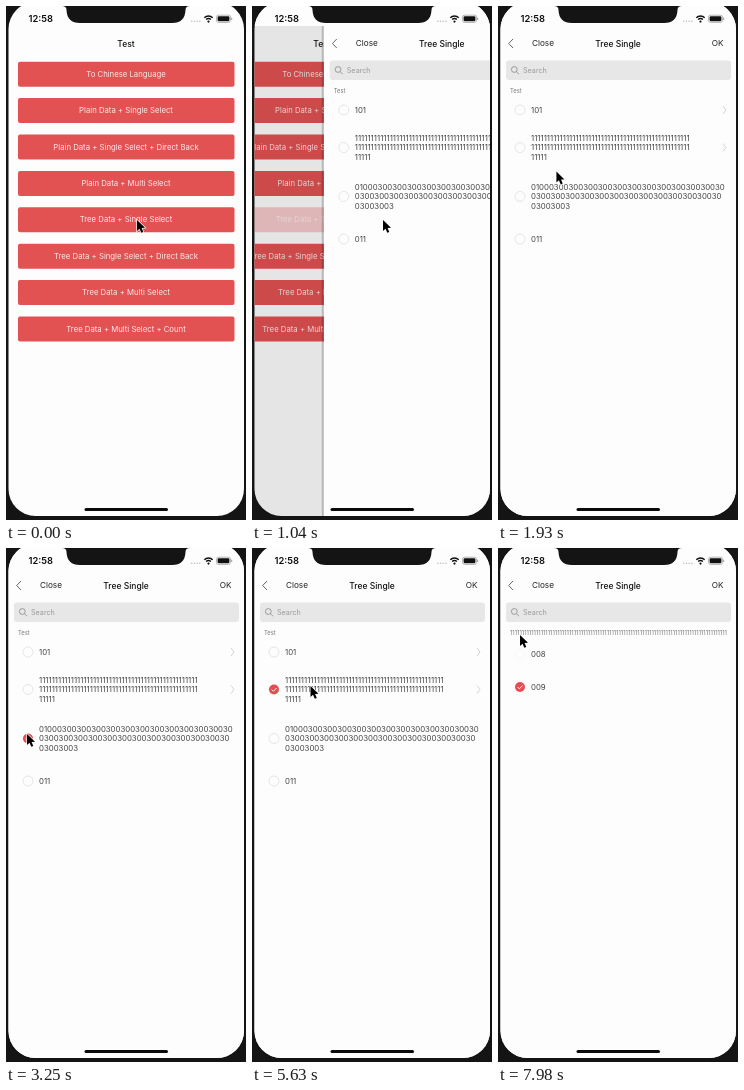
These frames come from a looping animation (240x514 px, 8 s). An HTML page with a canvas:

```html
<!DOCTYPE html>
<html lang="en">
<head>
<meta charset="utf-8">
<title>Tree select demo</title>
<style>
html, body { margin: 0; height: 100%; overflow: hidden; background: #141414; }
canvas { display: block; width: 240px; height: 514px; }
</style>
</head>
<body>
<canvas id="stage" width="240" height="514"></canvas>
<script>
const c = document.getElementById('stage').getContext('2d');
const LOOP = 8000, STEP = 147.9, RED = '#e25253';
const FONT = 'Inter, "Liberation Sans", sans-serif';
const BUTTONS = [
  'To Chinese Language', 'Plain Data + Single Select',
  'Plain Data + Single Select + Direct Back', 'Plain Data + Multi Select',
  'Tree Data + Single Select', 'Tree Data + Single Select + Direct Back',
  'Tree Data + Multi Select', 'Tree Data + Multi Select + Count'
];
const ONES = '1'.repeat(50);
const ROOT = [
  { y: 104, lines: ['101'], more: true },
  { y: 141.5, lines: [ONES, ONES, '11111'], more: true },
  { y: 190.5, lines: ['010003' + '003'.repeat(11) + '0', '03' + '003'.repeat(12) + '0', '03003003'] },
  { y: 233, lines: ['011'] }
];
const CHILDREN = [{ y: 106, lines: ['008'] }, { y: 139, lines: ['009'] }];
// pointer keys: step, x, y
const POINTER = [
  [9, 131, 214], [14, 50, 160], [19, 21, 186], [23, 21, 186], [29, 21, 139],
  [32, 21, 139], [38, 58.5, 138], [42, 58.5, 138], [46, 17.5, 135],
  [47, 17.5, 135], [49, 20, 137], [51, 20, 137], [54, 22, 87]
];

const spring = u => u <= 0 ? 0 : 1 - Math.exp(-u) * (1 + u);

function text(s, x, y, size, color, align = 'left', weight = 400) {
  c.font = `${weight} ${size}px ${FONT}`;
  c.textAlign = align;
  c.textBaseline = 'alphabetic';
  c.fillStyle = color;
  c.fillText(s, x, y + size * 0.36);
}

function box(x, y, w, h, r, color) {
  c.fillStyle = color;
  c.beginPath();
  c.roundRect(x, y, w, h, r);
  c.fill();
}

function line(points, color, width) {
  c.strokeStyle = color;
  c.lineWidth = width;
  c.beginPath();
  points.forEach(([x, y]) => c.lineTo(x, y));
  c.stroke();
}

function circle(x, y, r) {
  c.beginPath();
  c.arc(x, y, r, 0, 7);
}

// Draws in a shifted, clipped layer
function layer(dx, x, y, w, h, draw) {
  c.save();
  c.translate(dx, 0);
  c.beginPath();
  c.rect(x, y, w, h);
  c.clip();
  draw();
  c.restore();
}

function menu(n) {
  text('Test', 120, 37.5, 8.5, '#111', 'center', 500);
  BUTTONS.forEach((label, i) => {
    const y = 68 + 36.4 * i;
    c.globalAlpha = i === 4 && n >= 3 ? 0.3 : 1;
    box(12, y - 12.3, 216.5, 25, 2, RED);
    c.globalAlpha = 1;
    text(label, 120, y, 7.75, '#fbeaea', 'center');
  });
}

function radio(y, on, faint) {
  circle(22, y, 5);
  if (on) {
    c.fillStyle = '#e64d52';
    c.fill();
    line([[19.6, y], [21.4, y + 1.8], [24.6, y - 1.5]], '#fff', 0.9);
  } else {
    c.strokeStyle = faint ? '#f4f4f4' : '#dcdcdc';
    c.lineWidth = 0.7;
    c.stroke();
  }
}

function list(title, rows, isOn, isDim, faint) {
  text(title, 12, 84.5, 5.8, '#777');
  rows.forEach(({ y, lines, more }, i) => {
    c.globalAlpha = isDim(i) ? 0.25 : 1;
    lines.forEach((s, k) => text(s, 33, y + (k - (lines.length - 1) / 2) * 9.6, 7.8, '#444'));
    if (more) line([[225, y - 4], [228, y], [225, y + 4]], '#c8c8c8', 0.8);
    c.globalAlpha = 1;
    radio(y, isOn(i), faint);
  });
}

function treePage(n) {
  const ready = n > 6;
  box(2, 0, 236, 514, 0, '#fdfdfd');
  text('Close', 34, 37.5, 8.2, '#222');
  text('Tree Single', 120, 37.5, 8.5, '#111', 'center', 500);
  text('OK', 225.5, 37.5, 8.2, '#222', 'right');
  box(8, 54.5, 225, 19.5, 3, '#e7e7e7');
  text('Search', 25, 64.3, 7.2, '#999');
  if (ready) {
    line([[15, 33], [10.7, 37.5], [15, 42]], '#555', 0.9);
    circle(16.3, 63.5, 2.9);
    c.strokeStyle = '#888';
    c.lineWidth = 0.8;
    c.stroke();
    line([[18.4, 65.6], [21, 68.2]], '#888', 0.8);
  }
  const shift = 236 * spring((n - 40.3) * 2.27);
  layer(-shift, 2 + shift, 76, 236, 420, () => {
    list('Test', ready ? ROOT : [],
      i => i === 2 && n >= 22 && n < 33 || i === 1 && n >= 31,
      i => i === 2 && n >= 20 && n < 22 || i === 1 && n >= 40);
  });
  if (n > 40) layer(236 - shift, 2, 76, 227, 420, () => {
    list('1'.repeat(105), CHILDREN, i => i === 1 && n >= 50, i => i === 1 && n === 49, true);
  });
}

function phone() {
  // notch with flared top corners
  c.fillStyle = '#141414';
  c.beginPath();
  c.moveTo(56, 0);
  c.quadraticCurveTo(60.5, 0, 60.5, 4);
  c.quadraticCurveTo(61, 17, 74, 17);
  c.lineTo(166, 17);
  c.quadraticCurveTo(179, 17, 179.5, 4);
  c.quadraticCurveTo(179.5, 0, 184, 0);
  c.fill();
  text('12:58', 22.5, 13, 9.4, '#111', 'left', 600);
  for (let i = 0; i < 4; i++) box(185 + i * 2.7, 14.5, 1.5, 1.5, 0.7, '#bbb');
  c.strokeStyle = '#111';
  c.lineWidth = 1.4;
  for (const r of [3.4, 6]) {
    c.beginPath();
    c.arc(202.5, 16, r, -2.35, -0.79);
    c.stroke();
  }
  circle(202.5, 15.6, 1.1);
  c.fillStyle = '#111';
  c.fill();
  c.strokeStyle = '#999';
  c.lineWidth = 0.7;
  c.beginPath();
  c.roundRect(210.5, 9.2, 14, 7.2, 2);
  c.stroke();
  box(211.6, 10.3, 11.8, 5, 1.2, '#111');
  box(225.2, 11.5, 1, 2.6, 0.5, '#999');
  box(78.5, 502, 83.5, 3, 1.5, '#0a0a0a');
}

function pointer(n) {
  let k = 0;
  while (k < POINTER.length - 2 && n > POINTER[k + 1][0]) k++;
  const [a, x0, y0] = POINTER[k], [b, x1, y1] = POINTER[k + 1];
  const u = Math.min(1, Math.max(0, (n - a) / (b - a)));
  const e = u * u * (3 - 2 * u);
  c.save();
  c.translate(x0 + (x1 - x0) * e, y0 + (y1 - y0) * e);
  c.beginPath();
  [[0, 0], [0, 11], [2.5, 8.7], [4.3, 12.8], [6.3, 12], [4.6, 8], [8, 7.8]]
    .forEach(([x, y]) => c.lineTo(x, y));
  c.closePath();
  c.lineWidth = 1.3;
  c.strokeStyle = '#fff';
  c.stroke();
  c.fillStyle = '#000';
  c.fill();
  c.restore();
}

function draw(ms) {
  const n = Math.floor((ms % LOOP + 8) / STEP);
  const push = n < 6 ? 0 : n > 9 ? 1 : spring(0.92 + (n - 6) * 1.54);
  box(0, 0, 240, 514, 0, '#141414');
  c.save();
  c.beginPath();
  c.roundRect(2.5, -4, 235.5, 514, 27);
  c.clip();
  box(0, 0, 240, 514, 0, '#fdfdfd');
  if (push < 1) {
    const x = 236 * (1 - push);
    layer(-71 * push, 0, 0, 320, 514, () => menu(n));
    if (push > 0) {
      box(0, 0, 240, 514, 0, `rgba(0,0,0,${0.19 * push * push})`);
      box(x, 0, 2, 514, 0, 'rgba(0,0,0,.2)');
    }
    if (push > 0) layer(x, 2, 0, 236, 514, () => treePage(n));
    // the status bar stays clear of the dimming
    if (push > 0) box(0, 0, 240, 20, 0, '#fdfdfd');
  } else treePage(n);
  phone();
  c.restore();
  pointer(n);
}

function tick(now) {
  draw(now);
  requestAnimationFrame(tick);
}
draw(0);
requestAnimationFrame(tick);
</script>
</body>
</html>
```
